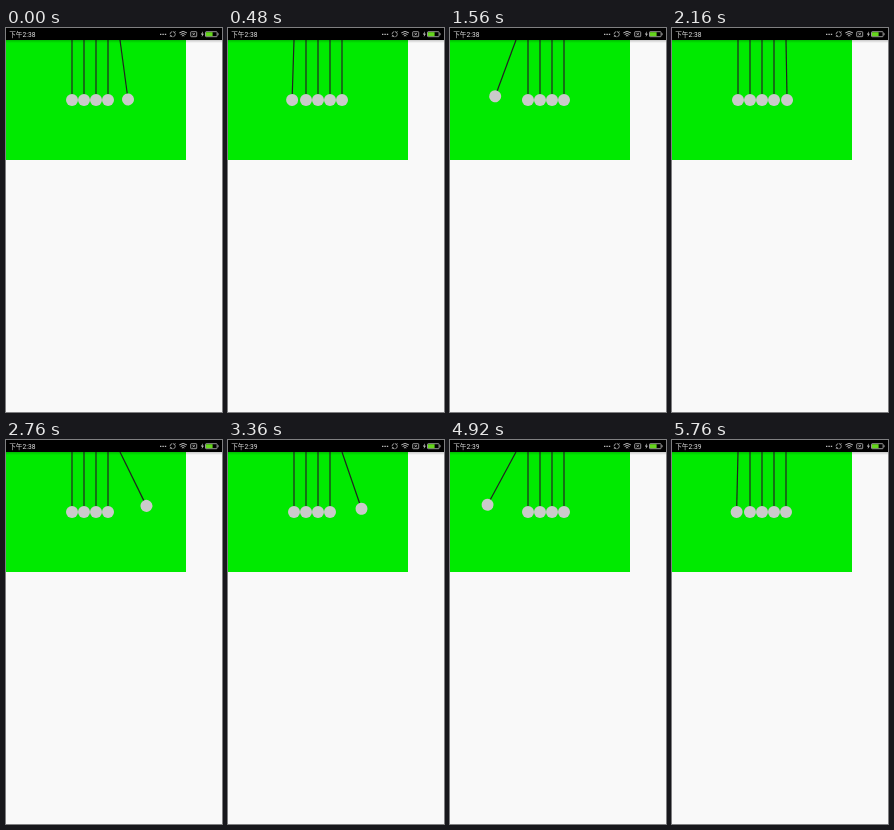
These frames come from a looping animation (216 by 384 pixels, 5.88 s). An HTML page:

```html
<!DOCTYPE html>
<html lang="zh">
<head>
<meta charset="utf-8">
<title>Newton's cradle</title>
<style>
  html, body { margin: 0; width: 100%; height: 100%; overflow: hidden; background: #f9f9f9; }
  svg { display: block; width: 100vw; height: 100vh; }
  text { font: 6.7px Roboto, "Noto Sans CJK SC", "Noto Sans CJK", sans-serif; fill: #ddd; }
</style>
</head>
<body>
<svg viewBox="0 0 216 384">
  <defs>
    <linearGradient id="shade" x2="0" y2="1">
      <stop offset="0" stop-opacity=".2"/>
      <stop offset="1" stop-opacity="0"/>
    </linearGradient>
  </defs>
  <rect width="216" height="384" fill="#f9f9f9"/>
  <rect y="12" width="180" height="120" fill="#00ea00"/>
  <g id="cradle"></g>
  <rect y="12" width="216" height="3" fill="url(#shade)"/>
  <rect width="216" height="12" fill="#000"/>
  <text id="clock" x="3.2" y="8.6"></text>
  <g fill="none" stroke="#bbb" stroke-width=".8">
    <path d="M154 6.3h1.4m1 0h1.4m1 0h1.4" stroke-width="1.3"/>
    <circle cx="166.7" cy="6.2" r="2.6" stroke-dasharray="3.3 .8"/>
    <path d="M164 8.8l1.3-1.3m2.8-2.8l1.3-1.3"/>
    <path d="M173.3 4.9q3.8-3 7.6 0M174.6 6.5q2.5-2 5 0M175.9 8q1.2-1 2.4 0" stroke-width="1"/>
    <rect x="184.7" y="3.7" width="6" height="5" rx=".6"/>
    <path d="M186.5 5l2.4 2.4m0-2.4l-2.4 2.4"/>
    <rect x="199.5" y="3.7" width="11.6" height="5" rx=".7"/>
    <path d="M212.1 5.2v2"/>
  </g>
  <path d="M196.9 3.2l-2 3.3h1.4l-.6 2.6 2.2-3.4h-1.4z" fill="#ccc"/>
  <rect x="200" y="4.2" width="6.6" height="4" fill="#65d51d"/>
</svg>
<script>
const LOOP = 5880, STEP = 120, MINUTE_TURN = 3120;
const AMPLITUDE = 30, LENGTH = 60, TOP = 12, RADIUS = 6;
const PIVOTS = [66, 78, 90, 102, 114];

// Quarter swings elapsed at a given time; zero is the first strike on the left ball.
const PACE = [[0, -.338], [960, .654], [2160, 2.117], [3360, 3.415],
              [4320, 4.436], [4920, 5.153], [5760, 5.865]];

const cradle = document.getElementById('cradle');
const clock = document.getElementById('clock');

function add(parent, tag, attrs) {
  const el = document.createElementNS('http://www.w3.org/2000/svg', tag);
  for (const key in attrs) el.setAttribute(key, attrs[key]);
  return parent.appendChild(el);
}

const pendulums = PIVOTS.map(x => {
  const group = add(cradle, 'g', {});
  add(group, 'line', { x1: x, y1: TOP, x2: x, y2: TOP + LENGTH, stroke: '#222', 'stroke-width': 1.2 });
  add(group, 'circle', { cx: x, cy: TOP + LENGTH, r: RADIUS, fill: '#cacaca' });
  return group;
});

function phaseAt(t) {
  let i = 1;
  while (i < PACE.length - 1 && t > PACE[i][0]) i++;
  const [t0, p0] = PACE[i - 1], [t1, p1] = PACE[i];
  return p0 + (p1 - p0) * (t - t0) / (t1 - t0);
}

const turn = (i, angle) =>
  pendulums[i].setAttribute('transform', `rotate(${angle} ${PIVOTS[i]} ${TOP})`);

function render(time) {
  const t = Math.floor(time % LOOP / STEP) * STEP;
  const phase = (phaseAt(t) + 4) % 4;
  const angle = AMPLITUDE * (1 - Math.cos(Math.PI * phase)) / 2;
  const left = phase < 2;
  turn(0, left ? angle : 0);
  turn(PIVOTS.length - 1, left ? 0 : -angle);
  clock.textContent = t < MINUTE_TURN ? '下午2:38' : '下午2:39';
}

const start = performance.now();
function tick() {
  render(performance.now() - start);
  requestAnimationFrame(tick);
}
tick();
</script>
</body>
</html>
```
